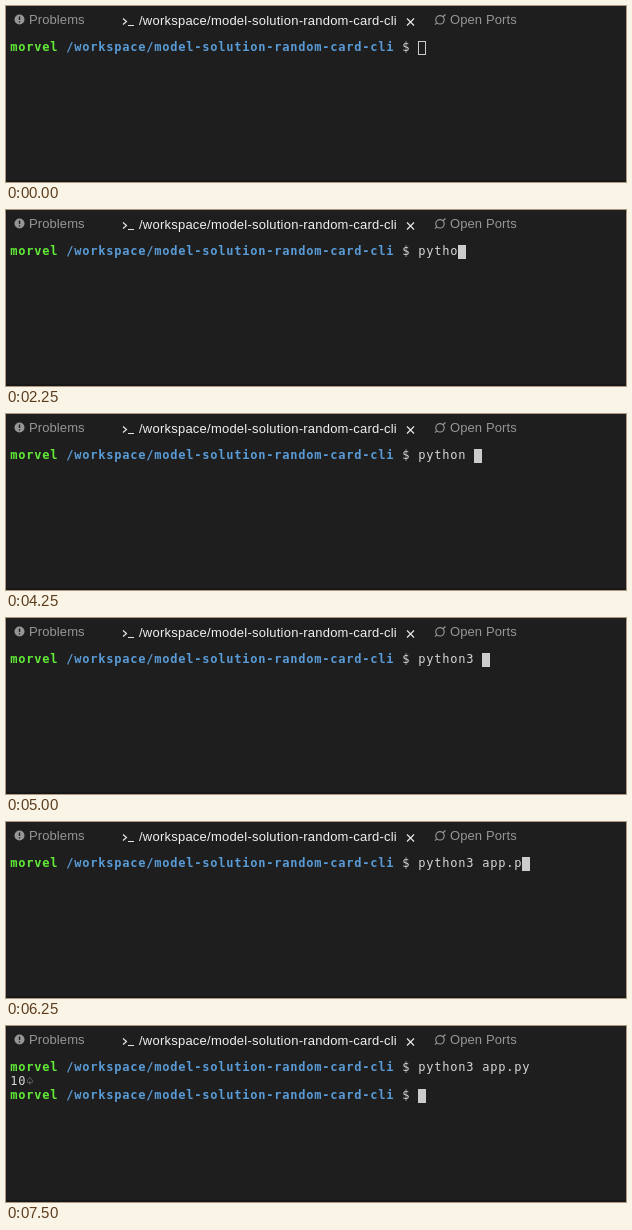
Write an HTML page that moves like this. It is 620x176 px and loops after 8000 ms.

```html
<!DOCTYPE html>
<html lang="en">
<head>
<meta charset="utf-8">
<title>Terminal</title>
<style>
  html, body { margin: 0; width: 100%; height: 100%; overflow: hidden; background: #1e1e1e; }
  svg { display: block; }
  text { white-space: pre; }
  .tab { font: 13px "Liberation Sans", Arial, sans-serif; letter-spacing: .1px; fill: #969696; }
  .active { letter-spacing: .23px; fill: #f0f0f0; }
  .term { font: 12px "DejaVu Sans Mono", monospace; letter-spacing: .776px; fill: #d6d6d6; }
  .user { font-weight: bold; fill: #62ea38; }
  .path { font-weight: bold; fill: #5a9bd6; }
  .line { fill: none; stroke: #969696; stroke-width: 1.2; }
  .bright { stroke: #e4e4e4; }
</style>
</head>
<body>
<svg width="620" height="176" viewBox="0 0 620 176">
  <rect width="620" height="176" fill="#1e1e1e"/>
  <rect y="174" width="620" height="2" fill="#171717"/>

  <circle cx="13.5" cy="13.5" r="5" fill="#969696"/>
  <path d="M13.5 10.5v3.6M13.5 15.2v1.4" stroke="#1e1e1e" stroke-width="1.4"/>
  <text class="tab" x="23" y="18">Problems</text>

  <path class="line bright" d="M117 12.5l3.5 3-3.5 3M122 19.5h6"/>
  <text class="tab active" x="133" y="19">/workspace/model-solution-random-card-cli</text>
  <path class="line bright" d="M401 12.5l7 7M408 12.5l-7 7"/>

  <circle class="line" cx="434" cy="13.8" r="4.2"/>
  <path class="line" d="M429 18.6l2-2M437 10.8l2.5-2.3"/>
  <text class="tab" x="444" y="18">Open Ports</text>

  <g id="rows" class="term"></g>
  <rect id="cursor"/>
</svg>
<script>
const LOOP = 8000, CELL = 8, ROW = 14, LEFT = 4, TOP = 35;
const PROMPT = [["user", "morvel"], ["path", "/workspace/model-solution-random-card-cli"], ["", "$"]];
const INDENT = PROMPT.reduce((n, [, s]) => n + s.length + 1, 0);

// Start time and command line; the cursor follows the text.
const steps = [
  [0, ""], [1750, "p"], [2250, "pytho"], [3000, "python"], [3500, "python 3"],
  [4250, "python "], [4500, "python3"], [5000, "python3 "], [5500, "python3 ap"],
  [5750, "python3 app"], [6000, "python3 app."], [6250, "python3 app.p"], [6750, "python3 app.py"]
];
const FOCUS = 500, OUTPUT = 7250, DONE = 7500;

const rows = document.getElementById("rows");
const cursor = document.getElementById("cursor");

function write(col, row, string, cls = "") {
  const t = document.createElementNS("http://www.w3.org/2000/svg", "text");
  t.setAttribute("x", LEFT + col * CELL + .3);
  t.setAttribute("y", TOP + row * ROW + 10);
  t.setAttribute("class", cls);
  t.textContent = string;
  rows.append(t);
  return t;
}

function writePrompt(row) {
  let col = 0;
  return PROMPT.map(([cls, s]) => {
    const t = write(col, row, s, cls);
    col += s.length + 1;
    return t;
  });
}

function show(nodes, on) {
  for (const n of nodes) n.style.visibility = on ? "visible" : "hidden";
}

function placeCursor(col, row, filled) {
  const inset = filled ? 0 : .5;
  const box = {
    x: LEFT + col * CELL + inset, y: TOP + row * ROW + inset,
    width: CELL - 2 * inset, height: ROW - 2 * inset,
    fill: filled ? "#cccccc" : "none", stroke: filled ? "none" : "#cccccc"
  };
  for (const k in box) cursor.setAttribute(k, box[k]);
}

writePrompt(0);
const command = write(INDENT, 0, "");
const result = [write(0, 1, "10"), write(2, 1, "♤")];
const nextPrompt = writePrompt(2);

function draw(time) {
  const typed = steps.filter(s => s[0] <= time).pop()[1];
  command.textContent = typed;
  show(result, time >= OUTPUT);
  show(nextPrompt, time >= DONE);
  if (time >= DONE) placeCursor(INDENT, 2, true);
  else if (time >= OUTPUT) placeCursor(0, 2, true);
  else placeCursor(INDENT + typed.length, 0, time >= FOCUS);
}

const start = performance.now();
function tick() {
  draw((performance.now() - start) % LOOP);
  requestAnimationFrame(tick);
}
tick();
</script>
</body>
</html>
```
